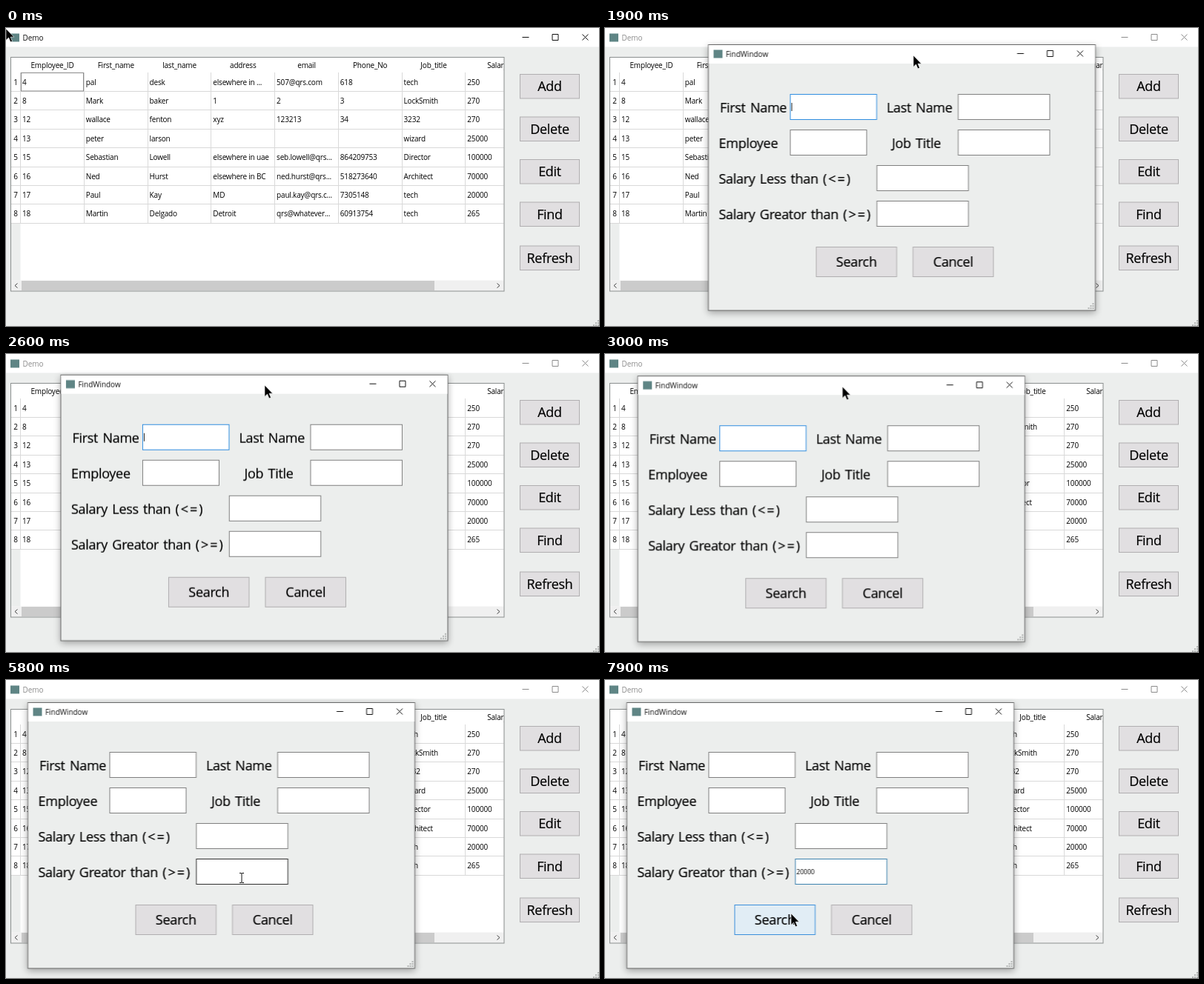
An HTML page that plays this animation: 800x402 px, repeating every 8000 ms.

```html
<!DOCTYPE html>
<html lang="en">
<head>
<meta charset="utf-8">
<title>Demo</title>
<style>
html, body { margin: 0; width: 100%; height: 100%; overflow: hidden; background: #eceeed; }
svg { display: block; width: 800px; height: 402px; }
text { font-family: "Open Sans", "Noto Sans", sans-serif; fill: #000; white-space: pre; }
.small { font-size: 10px; letter-spacing: -.2px; }
.title { font-size: 10px; letter-spacing: -.05px; }
.big { font-size: 18px; letter-spacing: -.3px; word-spacing: 1.9px; stroke: #000; stroke-width: .2px; }
.typed { font-size: 8.7px; letter-spacing: -.1px; }
.mid { text-anchor: middle; }
.button rect { fill: #e1dfe1; stroke: #b0aeb0; }
.field { fill: #fff; stroke: #7f7f7f; }
.bar text { fill: currentColor; }
.bar path { stroke: currentColor; fill: none; }
.shadow { fill: #eceeed; stroke: #686868; filter: drop-shadow(0 3px 5px rgba(0, 0, 0, .32)); }

#mainBar, #cellFocus, #drag, #pop, #arrow, #beam, #pointer, #find rect, #search rect, #first, #greater,
#firstCaret, #typing, #lastCaret { animation: 8s linear infinite; }
#mainBar { color: #111; animation-name: deactivate; }
#cellFocus { animation-name: cellFocus; animation-timing-function: step-end; }
#drag { animation-name: drag; }
#pop { transform-origin: 260.75px 179.5px; animation-name: pop; }
#pointer { animation-name: pointer; }
#arrow { animation-name: arrow; animation-timing-function: step-end; }
#beam { animation-name: beam; animation-timing-function: step-end; }
#find rect { animation-name: findHover; }
#search rect { animation-name: searchHover; }
#first { animation-name: firstFocus; animation-timing-function: step-end; }
#greater { animation-name: greaterFocus; animation-timing-function: step-end; }
#firstCaret { animation-name: blink; animation-timing-function: step-end; }
#typing { animation-name: typing; animation-timing-function: step-end; }
#lastCaret { animation-name: lastCaret; animation-timing-function: step-end; }

@keyframes deactivate {
  0%, 15% { color: #111; }
  16.25% { color: #555; }
  18.75%, 100% { color: #8c8c8c; }
}
@keyframes cellFocus {
  0% { opacity: 1; }
  15%, 100% { opacity: 0; }
}
@keyframes pop {
  0%, 15.5% { opacity: 0; transform: scale(.955); }
  16.25% { opacity: .16; transform: scale(.9626); }
  18.75%, 100% { opacity: 1; transform: none; }
}
@keyframes drag {
  0%, 25% { transform: translate(139.5px, 22px); }
  32.5% { transform: translate(74px, 27.7px); }
  40%, 100% { transform: translate(29.5px, 30px); }
}
@keyframes pointer {
  0%, 1.25% { transform: translate(0, 1px); }
  7.5% { transform: translate(715px, 298px); }
  11.25%, 17.5% { transform: translate(706px, 240px); }
  23.75%, 25% { transform: translate(416px, 37px); }
  32.5% { transform: translate(349px, 42px); }
  40%, 45% { transform: translate(306px, 45px); }
  52.5%, 53.75% { transform: translate(643px, 205px); }
  57.5% { transform: translate(575px, 305px); }
  66.25%, 91.25% { transform: translate(318px, 267px); }
  95%, 100% { transform: translate(251px, 315px); }
}
@keyframes arrow {
  0%, 91.25% { opacity: 1; }
  66.25% { opacity: 0; }
}
@keyframes beam {
  0%, 91.25% { opacity: 0; }
  66.25% { opacity: 1; }
}
@keyframes findHover {
  0%, 10% { fill: #e1dfe1; stroke: #b0aeb0; }
  11.25%, 17.5% { fill: #cfe5f6; stroke: #3d84bd; }
  20%, 100% { fill: #e1dfe1; stroke: #b0aeb0; }
}
@keyframes searchHover {
  0%, 95% { fill: #e1dfe1; stroke: #b0aeb0; }
  97.5%, 100% { fill: #e1edf5; stroke: #3a8edb; }
}
@keyframes firstFocus {
  0% { stroke: #2f8de0; }
  45% { stroke: #3c82ae; }
  53.75%, 100% { stroke: #7f7f7f; }
}
@keyframes greaterFocus {
  0% { stroke: #7f7f7f; }
  66.25% { stroke: #303030; }
  75%, 100% { stroke: #3c82ae; }
}
@keyframes blink {
  0%, 18.75%, 31.25%, 43.75% { opacity: 1; }
  25%, 37.5%, 50%, 100% { opacity: 0; }
}
@keyframes typing {
  0% { transform: none; }
  80% { transform: translate(4.9px, 0); }
  82.5% { transform: translate(9.8px, 0); }
  85% { transform: translate(14.7px, 0); }
  87.5% { transform: translate(19.6px, 0); }
  90%, 100% { transform: translate(26px, 0); }
}
@keyframes lastCaret {
  0%, 93.75%, 100% { opacity: 0; }
  75% { opacity: 1; }
}
</style>
</head>
<body>
<svg viewBox="0 0 800 402">
  <defs><clipPath id="tableClip"><rect x="7" y="40" width="664.5" height="315"/></clipPath></defs>
  <rect width="800" height="402" fill="#eceeed"/>
  <rect width="800" height="25.5" fill="#fff"/>
  <g id="mainBar" class="bar"></g>
  <g id="table" clip-path="url(#tableClip)"></g>
  <rect x="6.5" y="39.5" width="665.5" height="315.5" fill="none" stroke="#8b8f8f"/>
  <g id="sideButtons"></g>
  <g id="drag"><g id="pop"></g></g>
  <g id="pointer">
    <path id="arrow" d="M0 0V15.4L3.6 12.1 6 17.8 8.5 16.8 6.1 11.2H10.8Z" fill="#000" stroke="#fff" stroke-width=".6"/>
    <path id="beam" d="M-3 -6.5H-1L0 -5.8 1 -6.5H3M0 -5.8V5.8M-3 6.5H-1L0 5.8 1 6.5H3" fill="none" stroke="#111"/>
  </g>
</svg>
<script>
const $ = id => document.getElementById(id);
const rect = (x, y, w, h, attrs = '') =>
  `<rect x="${x}" y="${y}" width="${w}" height="${h}" ${attrs}/>`;
const text = (x, y, str, cls) => `<text x="${x}" y="${y}" class="${cls}">${str}</text>`;
const line = (d, color) => `<path d="${d}" stroke="${color}" fill="none"/>`;
const button = (x, y, w, h, label, id) =>
  `<g class="button" id="${id}">${rect(x, y, w, h)}${text(x + w / 2, y + h / 2 + 6.5, label, 'big mid')}</g>`;
const field = (x, y, w, id = '') => rect(x, y, w, 34, `class="field" id="${id}"`);

// Icon, caption and the three window controls; c is the x of the minimise line
function titleBar(x, caption, c) {
  return rect(x, 7.5, 12, 11, 'fill="#5f8585"') +
    text(x + 16.5, 16.7, caption, 'title') +
    `<path d="M${c} 12.5h9M${c + 40.5} 8.5h8v8h-8zM${c + 81} 8.5l8 8m0 -8l-8 8"/>`;
}

function grip(right, bottom) {
  let dots = '';
  for (let r = 0; r < 3; r++)
    for (let c = 0; c <= r; c++)
      dots += rect(right - 2 - 3 * c, bottom - 8 + 3 * r, 2, 2, 'fill="#b4b6b5"');
  return dots;
}

const heads = 'Employee_ID,First_name,last_name,address,email,Phone_No,Job_title,Salary'.split(',');
const people = [
  '4,pal,desk,elsewhere in ...,507@qrs.com,618,tech,250',
  '8,Mark,baker,1,2,3,LockSmith,270',
  '12,wallace,fenton,xyz,123213,34,3232,270',
  '13,peter,larson,,,,wizard,25000',
  '15,Sebastian,Lowell,elsewhere in uae,seb.lowell@qrs...,864209753,Director,100000',
  '16,Ned,Hurst,elsewhere in BC,ned.hurst@qrs...,518273640,Architect,70000',
  '17,Paul,Kay,MD,paul.kay@qrs.c...,7305148,tech,20000',
  '18,Martin,Delgado,Detroit,qrs@whatever...,60913754,tech,265'
].map(row => row.split(','));

function table() {
  const colX = i => 19.5 + 85.75 * i, rowY = i => 60 + 25.4 * i;
  const snap = v => Math.floor(v) + .5;
  let out = rect(7, 40, 665, 315, 'fill="#fff"') + rect(7, 263.5, 12.5, 77, 'fill="#eceeed"');
  heads.forEach((h, i) => {
    out += line(`M${snap(colX(i))} 60V263.5`, '#d9d9d9') + text(colX(i) + 43, 53.7, h, 'small mid');
  });
  people.forEach((row, r) => {
    const base = rowY(r) + 16.6;
    out += line(`M7 ${snap(rowY(r + 1))}H672`, '#d9d9d9') + text(13, base, r + 1, 'small mid');
    row.forEach((cell, c) => out += text(colX(c) + 2.6, base, cell, 'small'));
  });
  return out + rect(20.5, 60.5, 84, 24.5, 'id="cellFocus" fill="none" stroke="#8a8a8a"') +
    rect(7, 340.5, 665, 14.5, 'fill="#f0f0f0"') + rect(21, 341, 557, 13, 'fill="#cbcbcb"') +
    line('M15.5 344.5l-3.5 3 3.5 3M662.5 344.5l3.5 3 -3.5 3', '#444');
}

function dialog() {
  const sign = op => `<tspan style="letter-spacing:1.9px">(${op}=)</tspan>`;
  return rect(0, .5, 522, 358.5, 'class="shadow"') +
    rect(.5, 1, 521, 25, 'fill="#fff"') +
    `<g class="bar" color="#111">${titleBar(7, 'FindWindow', 416.5)}</g>` +
    text(15.5, 91.5, 'First Name', 'big') + field(110.5, 67.5, 116.5, 'first') +
    rect(112, 79, 1, 11, 'id="firstCaret" fill="#222"') +
    text(240.5, 91.5, 'Last Name', 'big') + field(337, 67.5, 123.5) +
    text(14, 139.5, 'Employee', 'big') + field(110.5, 115.5, 103) +
    text(247.5, 139.5, 'Job Title', 'big') + field(337, 115.5, 123.5) +
    text(14, 187.5, 'Salary Less than ' + sign('&lt;'), 'big') + field(227.3, 163.5, 123.5) +
    text(14, 235.5, 'Salary Greator than ' + sign('&gt;'), 'big') + field(227.3, 211.5, 123.5, 'greater') +
    text(228.8, 232.3, '20000', 'typed') +
    `<g id="typing">${rect(228.8, 219, 30, 19, 'fill="#fff"')}${rect(229, 223, 1, 11, 'id="lastCaret" fill="#222"')}</g>` +
    button(145.5, 273.5, 108.5, 40, 'Search', 'search') +
    button(276, 273.5, 108.5, 40, 'Cancel', 'cancel') +
    grip(520, 357);
}

$('mainBar').innerHTML = titleBar(6, 'Demo', 696.5);
$('table').innerHTML = table();
$('sideButtons').innerHTML =
  [['Add', 62.5], ['Delete', 120], ['Edit', 177.5], ['Find', 235], ['Refresh', 294]]
    .map(([label, y]) => button(693.5, y, 80, 32.5, label, label.toLowerCase())).join('') + grip(800, 402);
$('pop').innerHTML = dialog();
</script>
</body>
</html>
```
